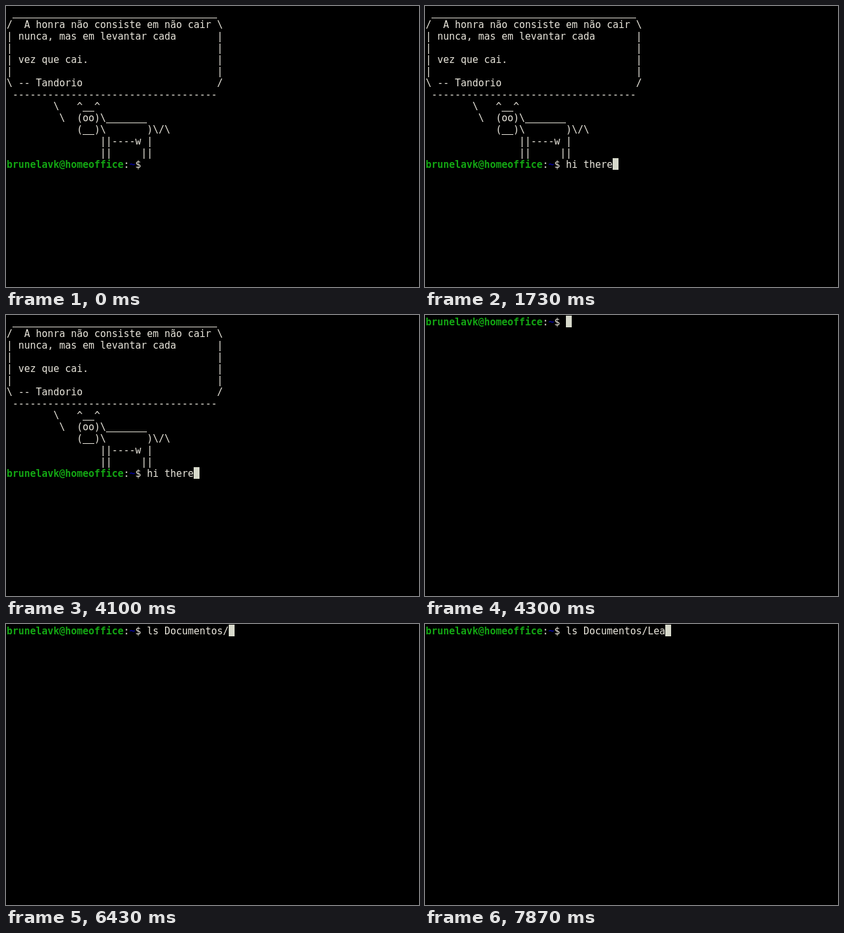
An HTML page with a canvas that plays this animation: 636 px wide and 434 px high, repeating every 8000 ms.

```html
<!DOCTYPE html>
<html lang="pt">
<head>
<meta charset="utf-8">
<title>Terminal</title>
<style>
  html, body { margin: 0; width: 100%; height: 100%; overflow: hidden; background: #000; }
  canvas { display: block; }
</style>
</head>
<body>
<canvas id="stage" width="636" height="434"></canvas>
<script>
const ctx = document.getElementById('stage').getContext('2d');
const LOOP = 8000;
const CELL_W = 9, CELL_H = 18, MARGIN = 1, BASELINE = 15;
const FONT = '15px "DejaVu Sans Mono", monospace';
const COLOR = { text: '#e9e6dc', user: '#13a613', path: '#00008f', cursor: '#d7d9cb' };

const boxed = (left, text, right) => left + text.padEnd(35) + right;
const at = (...parts) => parts.reduce((line, [col, text]) => line.padEnd(col) + text, '');

const greeting = [
  ' ' + '_'.repeat(35),
  boxed('/', '  A honra não consiste em não cair', '\\'),
  boxed('|', ' nunca, mas em levantar cada', '|'),
  boxed('|', '', '|'),
  boxed('|', ' vez que cai.', '|'),
  boxed('|', '', '|'),
  boxed('\\', ' -- Tandorio', '/'),
  ' ' + '-'.repeat(35),
  at([8, '\\'], [12, '^__^']),
  at([9, '\\'], [12, '(oo)\\_______']),
  at([12, '(__)\\'], [24, ')\\/\\']),
  at([16, '||----w |']),
  at([16, '||'], [23, '||'])
];

const prompt = [
  ['brunelavk@homeoffice', COLOR.user, true],
  [':', COLOR.text, false],
  ['~', COLOR.path, true],
  ['$ ', COLOR.text, false]
];

// [start ms, typed command, cursor visible]
const steps = [
  [0, '', false], [170, '', true],
  [570, 'h', true], [600, 'hi', true], [1000, 'hi ', true],
  [1330, 'hi t', true], [1370, 'hi th', true], [1500, 'hi the', true],
  [1670, 'hi ther', true], [1730, 'hi there', true],
  [2300, 'hi there', false], [2900, 'hi there', true],
  [3500, 'hi there', false], [4100, 'hi there', true],
  [4300, '', true], [4500, 'l', true], [4630, 'ls', true], [4870, 'ls ', true],
  [5330, 'ls D', true], [5830, 'ls Do', true], [5930, 'ls Doc', true],
  [6430, 'ls Documentos/', true], [6930, 'ls Documentos/L', true],
  [7500, 'ls Documentos/L', false], [7570, 'ls Documentos/Le', true],
  [7870, 'ls Documentos/Lea', true]
];
const CLEAR_AT = 4300;

function write(text, col, row, color = COLOR.text, bold = false) {
  ctx.font = (bold ? 'bold ' : '') + FONT;
  ctx.fillStyle = color;
  const y = MARGIN + row * CELL_H + BASELINE;
  for (const char of text) {
    const x = MARGIN + CELL_W * col++;
    // Underscores join into one crisp line.
    if (char === '_') ctx.fillRect(x, y + 2, CELL_W, 1);
    else ctx.fillText(char, x, y);
  }
  return col;
}

function draw(time) {
  ctx.fillStyle = '#000';
  ctx.fillRect(0, 0, 636, 434);

  let row = 0;
  if (time < CLEAR_AT) {
    greeting.forEach((line, i) => write(line, 0, i));
    row = greeting.length;
  }

  const [, command, cursorOn] = steps.findLast(([start]) => start <= time);
  let col = 0;
  for (const [text, color, bold] of prompt) col = write(text, col, row, color, bold);
  col = write(command, col, row);

  if (cursorOn) {
    ctx.fillStyle = COLOR.cursor;
    ctx.fillRect(MARGIN + col * CELL_W, MARGIN + row * CELL_H, CELL_W, CELL_H);
  }
}

const origin = performance.now();
function tick() {
  draw((performance.now() - origin) % LOOP);
  requestAnimationFrame(tick);
}
tick();
</script>
</body>
</html>
```
